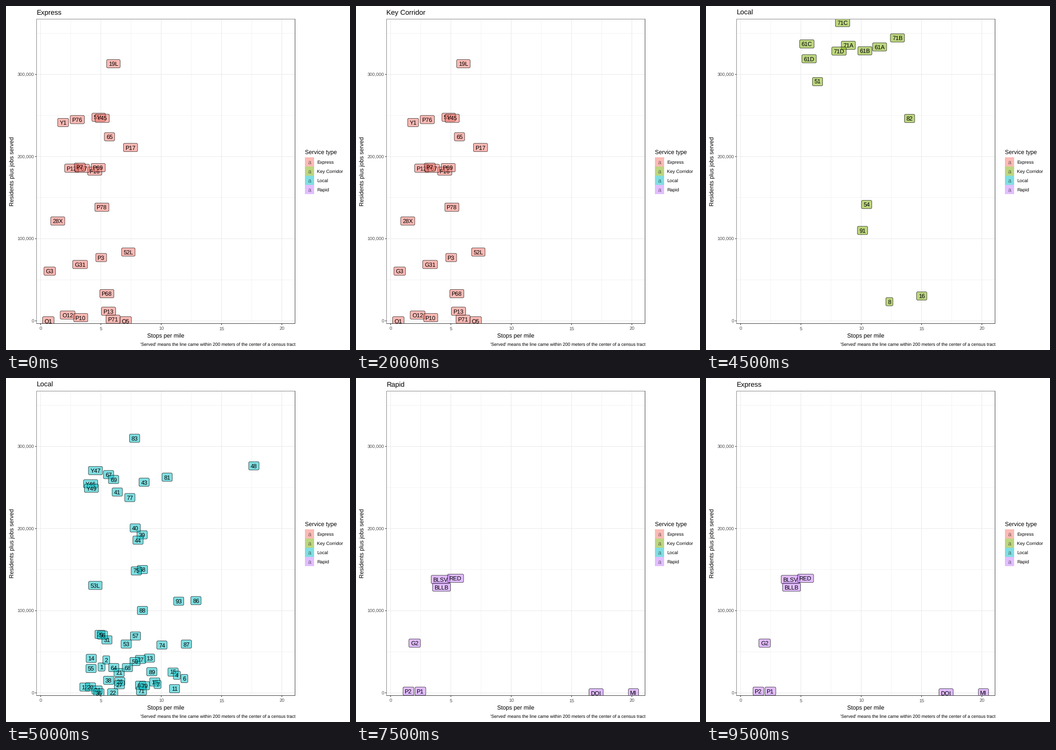
Animation, 748 px wide and 748 px high, one loop 10 s. Source, as a matplotlib script:

```python
import matplotlib.pyplot as plt
from matplotlib.animation import FuncAnimation
from matplotlib.patches import FancyBboxPatch, Rectangle

SIZE, DPI = 748, 64
PT = 72 / DPI  # points per pixel
STEP = 500     # ms per frame
FRAMES = 20

plt.rcParams["font.family"] = "Liberation Sans"
plt.rcParams["text.hinting"] = "none"  # keeps true letter spacing

LEFT, TOP, RIGHT, BOTTOM = 66.5, 28.5, 628.5, 690.5
X0, X_UNIT = 75.2, 26.23       # stops per mile
Y0, Y_UNIT = 684.6, 1.786      # thousands of people
CAPTION, SMALL, NORMAL, LARGE, LABEL = 9.8, 10.08, 12.6, 15.1, 12.65
GREY, DARK, SOFT, GRID = "#4d4d4d", "#333333", "#808080", "#ebebeb"

COLORS = {"Express": "#f8766d", "Key Corridor": "#7cae00",
          "Local": "#00bfc4", "Rapid": "#c77cff"}
TYPES = list(COLORS)

# Route name and label centre in pixels, in drawing order.
ROUTES = {
    "Express": [
        ("19L", 233.5, 125.5), ("28X", 112.5, 467.5), ("51L", 201.5, 242),
        ("52L", 266, 535), ("65", 225, 284.3), ("G3", 95, 576.5),
        ("G31", 161, 562), ("O1", 92, 684.6), ("O12", 134, 672),
        ("O5", 260.3, 684.6), ("P10", 162.5, 677.7), ("P12", 143, 352.7),
        ("P13", 223, 663.7), ("P16", 193, 359), ("P17", 270.7, 307.7),
        ("P3", 207, 547), ("P67", 166, 353), ("P68", 219.3, 625.5),
        ("P69", 200.5, 351.5), ("P7", 160.3, 350.5), ("P71", 232.7, 681),
        ("P76", 155, 247), ("P78", 208.5, 437.5), ("Y1", 124.2, 253.3),
        ("Y45", 209.3, 244.2)],
    "Key Corridor": [
        ("16", 469, 630.5), ("51", 242.5, 164.5), ("54", 349.2, 431.7),
        ("61A", 377.5, 89), ("61B", 345.5, 97.5), ("61C", 219.3, 82.5),
        ("61D", 224.2, 114.8), ("71A", 309.5, 85.5), ("71B", 416.3, 69.3),
        ("71C", 297, 36), ("71D", 289.3, 98), ("8", 398.7, 643),
        ("82", 442.7, 244.5), ("91", 340.3, 488)],
    "Local": [
        ("1", 207.7, 628.3), ("11", 366.5, 675.5), ("12", 171.5, 672),
        ("13", 312, 609), ("14", 185.3, 609.7), ("15", 363.2, 639.5),
        ("17", 292.5, 612), ("18", 323.5, 661), ("2", 218, 613),
        ("20", 183.7, 671.7), ("21", 246, 640.5), ("22", 232, 684.6),
        ("24", 198, 678.3), ("26", 247.3, 660), ("27", 246.5, 667),
        ("29", 204.5, 557.5), ("31", 219.5, 569.5), ("36", 202, 684.6),
        ("38", 223, 657.3), ("39", 296, 341), ("4", 371.5, 646.3),
        ("40", 281, 326), ("41", 242, 248), ("43", 300.3, 226.7),
        ("44", 287, 352.7), ("48", 539, 191), ("53", 261.3, 578.5),
        ("53L", 194.3, 451), ("55", 185, 631.7), ("56", 209.7, 559),
        ("57", 281.5, 561), ("58", 296.7, 416.5), ("59", 280.5, 616.5),
        ("6", 387.7, 653.5), ("60", 292.7, 668), ("64", 234.3, 629.7),
        ("67", 223, 210), ("68", 264, 629.7), ("69", 234, 220.7),
        ("7", 329.5, 666.3), ("71", 294.7, 680.3), ("74", 339, 580.7),
        ("75", 283.3, 419.5), ("77", 269.2, 260), ("79", 301, 669),
        ("81", 350.3, 215.7), ("83", 279.7, 131), ("86", 413, 484),
        ("87", 392.2, 578.7), ("88", 296.7, 505.5), ("89", 317, 638.7),
        ("93", 375.5, 485.2), ("Y46", 184, 230), ("Y47", 194.5, 201.3),
        ("Y49", 185.7, 239.7)],
    "Rapid": [
        ("BLLB", 186, 454.7), ("BLSV", 183.7, 438), ("DQI", 522, 684.6),
        ("G2", 127.5, 576.5), ("MI", 603.3, 684.6), ("P1", 140, 681),
        ("P2", 114, 681), ("RED", 216.5, 435.5)],
}

# Advance widths in em of the letters that differ from the usual capital.
EM = dict(I=.278, L=.556, C=.722, D=.722, R=.722, G=.778, O=.778, Q=.778, M=.833)

fig = plt.figure(figsize=(SIZE / DPI, SIZE / DPI), dpi=DPI, facecolor="white")
ax = fig.add_axes([0, 0, 1, 1])
ax.set_xlim(0, SIZE)
ax.set_ylim(SIZE, 0)
ax.axis("off")


def write(x, y, s, size, ha="left", color="black", **kw):
    return ax.text(x, y, s, fontsize=size * PT, ha=ha, va="baseline",
                   color=color, **kw)


def line(xs, ys, color, width, z=1, cap="butt"):
    ax.plot(xs, ys, color=color, lw=width * PT, zorder=z,
            solid_capstyle=cap, solid_joinstyle="miter", snap=False)


def text_width(s):
    return LABEL * sum(EM.get(c, .667 if c.isalpha() else .556) for c in s)


def draw_label(name, x, y, color, z):
    """Rounded, half-transparent box with the route name, cut at the panel."""
    w, h = text_width(name) + 8.25, 18
    box = FancyBboxPatch((x - w / 2, y - h / 2), w, h,
                         boxstyle="round,pad=0,rounding_size=2.5",
                         fc=(color, .5), ec="black", lw=.7 * PT, zorder=z)
    ax.add_patch(box)
    text = write(x, y + 4.8, name, LABEL, "center", zorder=z + .005,
                 clip_on=True)
    for part in (box, text):
        part.set_clip_path(panel)
    return [box, text]


def draw_axes():
    for i in range(9):
        x, major = X0 + 2.5 * i * X_UNIT, i % 2 == 0
        if x < RIGHT:
            line([x, x], [TOP, BOTTOM], GRID, 1.2 if major else .6)
        if major:
            line([x, x], [BOTTOM, BOTTOM + 3.2], DARK, 1.2)
            write(x, 704.7, f"{2.5 * i:.0f}", SMALL, "center", GREY)
    for i in range(8):
        y, major = Y0 - 50 * i * Y_UNIT, i % 2 == 0
        line([LEFT, RIGHT], [y, y], GRID, 1.2 if major else .6)
        if major:
            line([LEFT - 3.2, LEFT], [y, y], DARK, 1.2)
            write(61, y + 3.9, f"{50000 * i:,}", SMALL, "right", GREY)
    # The frame is lighter along its top and left edges.
    line([LEFT, LEFT, RIGHT], [BOTTOM, TOP, TOP], SOFT, 1, 10, "projecting")
    line([LEFT, RIGHT, RIGHT], [BOTTOM, BOTTOM, TOP], DARK, 1, 11, "projecting")
    write(347, 721, "Stops per mile", NORMAL, "center")
    write(17, 359.7, "Residents plus jobs served", NORMAL, "center",
          rotation=90, rotation_mode="anchor")
    write(629, 739, "'Served' means the line came within 200 meters "
          "of the center of a census tract", CAPTION, "right")


def draw_legend():
    write(650, 322, "Service type", NORMAL)
    side = 19.85
    for i, (name, color) in enumerate(COLORS.items()):
        y = 329.3 + i * side
        ax.add_patch(Rectangle((650, y), side, side, fc=color, alpha=.5, lw=0))
        write(660, y + 14.9, "a", LABEL, "center", alpha=.5)
        write(676.5, y + 14.1, name, SMALL)


panel = Rectangle((67, 29), 562, 661, fc="none", ec="none")
ax.add_patch(panel)
draw_axes()
draw_legend()
title = write(66.3, 19, "", LARGE)
groups = {
    kind: [part for n, (name, x, y) in enumerate(ROUTES[kind])
           for part in draw_label(name, x, y, COLORS[kind], 3 + n * .01)]
    for kind in TYPES
}


def update(frame):
    # The title switches one step ahead of the labels.
    title.set_text(TYPES[(frame + 1) // 5 % 4])
    shown = TYPES[frame // 5 % 4]
    for kind, parts in groups.items():
        for part in parts:
            part.set_visible(kind == shown)
    return [title]


anim = FuncAnimation(fig, update, frames=FRAMES, interval=STEP, repeat=True)
plt.show()
```
